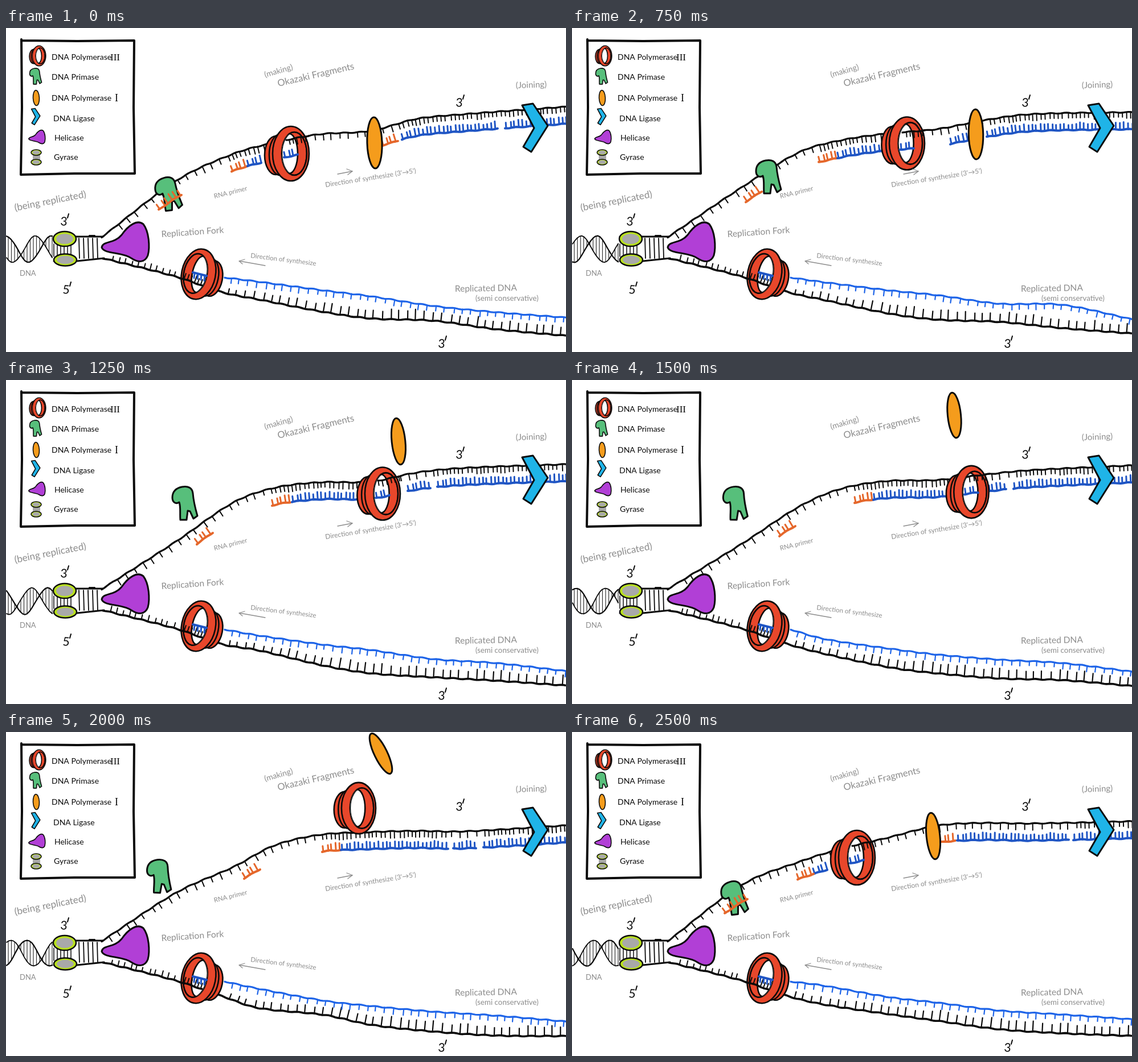
An HTML page with a canvas for the animation above (2750 ms loop, 983 by 570 pixels).

```html
<!DOCTYPE html>
<html lang="en">
<head>
<meta charset="utf-8">
<title>DNA replication</title>
<style>
html, body { margin: 0; width: 100%; height: 100%; overflow: hidden; background: #fff; }
canvas { display: block; }
</style>
</head>
<body>
<canvas id="stage" width="983" height="570"></canvas>
<script>
const ctx = document.getElementById('stage').getContext('2d');
const STEP = 250, STEPS = 11;
const INK = '#0b0b0b', GRAY = '#8c8c8c', RED = '#e8472b', GREEN = '#57bf7b', AMBER = '#f59c1c',
  BLUE = '#1f55c4', LEAD = '#1e64e8', RNA = '#e5672b', PURPLE = '#b13fd6', CYAN = '#1fb4e8', LIME = '#b9e21c';

// Poses are given at these steps and interpolated at the others.
const KEYS = [0, 1, 3, 5, 6, 8, 10];

// x, y, scale
const polymerase3 = [[500, 221, 1], [529, 217, 1], [588, 203, .97], [661, 200, .97], [701, 197, .96], [619, 134, .94], [500, 221, 1]];
// x, y, rotation
const primase = [[285, 292, -.12], [302, 288, -.1], [345, 262, 0], [314, 217, 0], [287, 217, .03], [269, 254, .05], [285, 292, -.12]];
// x, y, ry, rotation
const polymerase1 = [[647, 202, 45, -.03], [675, 194, 45, -.04], [709, 187, 44, -.02], [689, 108, 41, -.1],
  [671, 62, 40, -.1], [658, 38, 39, -.45], [634, 183, 41, -.1]];

// Horizontal extents of the pieces hanging below the lagging strand
const primer = [[268, 308], [279, 318], [305, 333], [335, 366], [364, 394], [418, 449], [396, 424]];
const growing = [[396, 424, 450], [408, 445, 486], [433, 466, 548], [467, 502, 620], [496, 529, 660], [555, 588, 776], [645, 676, 872]];
const oldPrimer = [[660, 690], [686, 708]];
const patch = [null, [650, 668], [664, 696], [705, 747], [722, 765], [785, 828]];
const joined = [[695, 863], [712, 878], [728, 990], [757, 990], [775, 990], [838, 990], [880, 990]];
const tail = [[876, 990], [890, 990]];

const LAG_X = [168, 300, 400, 470, 550, 640, 720, 800, 990];
const lagging = [
  [368, 268, 221, 202, 187, 181, 160, 152, 138], [368, 276, 223, 205, 186, 180, 161, 151, 142],
  [368, 279, 218, 198, 186, 178, 163, 152, 148], [368, 283, 215, 190, 180, 179, 163, 155, 148],
  [368, 287, 222, 192, 178, 176, 167, 159, 150], [368, 282, 237, 200, 181, 176, 174, 175, 164],
  [368, 268, 228, 206, 187, 165, 160, 161, 157]];
const LEAD_X = [440, 560, 640, 750, 860, 990];
const template = [
  [477, 500, 511, 515, 530, 542], [480, 500, 509, 514, 529, 542], [478, 503, 513, 517, 528, 538],
  [475, 503, 516, 523, 529, 538], [481, 506, 516, 525, 528, 539], [485, 498, 515, 527, 534, 535],
  [479, 497, 508, 523, 530, 535]];
const copy = [
  [446, 462, 472, 489, 500, 510], [447, 466, 473, 488, 497, 506], [447, 462, 470, 485, 487, 514],
  [449, 466, 475, 491, 498, 513], [455, 473, 483, 492, 498, 514], [451, 473, 482, 492, 499, 510],
  [446, 467, 476, 490, 497, 506]];

const PRIMASE = new Path2D('M-22-10C-22-22-15-27-5-29C6-31 13-27 14-18C15-5 18 8 22 22L15 27L9 14L5 13L3 29L-8 29C-9 18-7 6-10-2C-16 2-22-2-22-10Z');
const HELICASE = new Path2D('M168 386C170 374 190 380 203 364C214 348 230 336 241 345C251 358 253 385 249 400C244 413 232 413 220 405C205 394 172 398 168 386Z');
const LIGASE = new Path2D('M906 136L925 133L951 172L922 218L908 209L927 176Z');

const random = n => { const v = Math.sin(n * 12.9898) * 43758.5453; return v - Math.floor(v); };

function at(rows, step) {
  const i = KEYS.findLastIndex(key => key <= step), a = rows[i], b = rows[i + 1];
  if (KEYS[i] === step) return a;
  const u = (step - KEYS[i]) / (KEYS[i + 1] - KEYS[i]);
  return a && b && a.map((v, j) => v + (b[j] - v) * u);
}

// Smooth function through the given points
function curve(xs, ys) {
  const last = xs.length - 1;
  const slope = i => {
    const a = Math.max(i - 1, 0), b = Math.min(i + 1, last);
    return (ys[b] - ys[a]) / (xs[b] - xs[a]);
  };
  return x => {
    let i = 0;
    while (i < last - 1 && x > xs[i + 1]) i++;
    const h = xs[i + 1] - xs[i], u = (x - xs[i]) / h, w = 1 - u;
    return w * w * (1 + 2 * u) * ys[i] + u * u * (3 - 2 * u) * ys[i + 1]
      + h * u * w * (w * slope(i) - u * slope(i + 1));
  };
}

function line(points, color = INK, width = 2) {
  ctx.beginPath();
  points.forEach(([x, y]) => ctx.lineTo(x, y));
  ctx.strokeStyle = color;
  ctx.lineWidth = width;
  ctx.stroke();
}

function strand(f, from, to, color = INK, width = 3.2) {
  const points = [];
  for (let x = from; x <= to; x += 4) points.push([x, f(x) + .7 * Math.sin(x * .23)]);
  line(points, color, width);
}

// Bases perpendicular to a strand; side is 1 below it and -1 above it
function bases(f, from, to, { gap = 15, length = () => 10, side = 1, shift = 0, color = INK, width = 2 }) {
  for (let n = Math.floor((from - shift) / gap); n * gap + shift < to; n++) {
    const x = n * gap + shift + (random(n) - .5) * gap * .3;
    if (x < from || x > to) continue;
    const m = f(x + 1) - f(x), k = side * length(x) * (.8 + .4 * random(n + 7)) / Math.hypot(1, m);
    line([[x, f(x)], [x - m * k, f(x) + k]], color, width);
  }
}

function fragment(f, extent, color) {
  if (!extent) return;
  const [from, to] = extent, base = x => f(x) + 30;
  strand(base, from, to, color, 4);
  bases(base, from + 1, to, { gap: 7, length: () => 11, side: -1, shift: from + 3, color, width: 3 });
}

function shape(path, fill, x = 0, y = 0, scale = 1, angle = 0, width = 3) {
  ctx.save();
  ctx.translate(x, y);
  ctx.rotate(angle);
  ctx.scale(scale, scale);
  ctx.fillStyle = fill;
  ctx.strokeStyle = INK;
  ctx.lineWidth = width / scale;
  ctx.fill(path);
  ctx.stroke(path);
  ctx.restore();
}

function oval(x, y, rx, ry, angle = 0) {
  const path = new Path2D();
  path.ellipse(x, y, rx, ry, angle, 0, 7);
  return path;
}

function rings(x, y, scale, angle = 0, flip = 1, width = 2.6) {
  ctx.save();
  ctx.translate(x, y);
  ctx.rotate(angle);
  ctx.scale(flip, 1);
  const part = (path, fill) => shape(path, fill, 0, 0, scale, 0, width);
  part(oval(-26, 3, 20, 34), RED);
  part(oval(-19, 2, 19, 36), RED);
  part(oval(0, 0, 32, 48), RED);
  const hole = oval(6, 0, 22, 38);
  part(hole, RED);
  ctx.scale(scale, scale);
  ctx.clip(hole);
  ctx.scale(1 / scale, 1 / scale);
  part(oval(-3, 0, 15, 35), '#fff');
  part(hole, 'transparent');
  ctx.restore();
}

function gyrase(x, y, rx, ry, width) {
  shape(oval(x, y, rx, ry), LIME, 0, 0, 1, 0, width);
  ctx.fillStyle = '#a9a9a9';
  ctx.fill(oval(x, y, rx * .74, ry * .7));
}

function label(text, x, y, size, angle = 0, color = GRAY, family = 'Lato, sans-serif') {
  ctx.save();
  ctx.translate(x, y);
  ctx.rotate(angle * Math.PI / 180);
  ctx.font = `${size}px ${family}`;
  ctx.fillStyle = color;
  ctx.fillText(text, 0, 0);
  ctx.restore();
}

function helix(step) {
  const wave = offset => x => 389 - 23 * Math.cos((x - offset - step * 160 / 11) * Math.PI / 40);
  const a = wave(0), b = wave(-28);
  for (let x = 4; x < 82; x += 5.5) line([[x, a(x)], [x, b(x)]], '#333', 1.2);
  strand(a, 1, 82, INK, 2.2);
  strand(b, 1, 82, INK, 1.8);
}

function fork() {
  line([[84, 367], [120, 367], [170, 367]], INK, 3);
  line([[84, 410], [125, 410], [172, 405]], INK, 3);
  for (let x = 84; x < 118; x += 6) line([[x, 380], [x, 402]], INK, 1.5);
  for (let x = 128; x < 162; x += 8) line([[x, 370], [x + 1, 405]], INK, 1.8);
  line([[146, 365], [156, 365]]);
  gyrase(103, 371, 20, 13, 2.4);
  gyrase(104, 408, 20, 10.5, 2.4);
  shape(HELICASE, PURPLE);
}

function legend() {
  line([[27, 22], [125, 23], [225, 22], [224, 140], [226, 256], [120, 256], [26, 258], [28, 140], [27, 20]], INK, 4);
  rings(58, 49, .37, 0, 1, 1.6);
  shape(PRIMASE, GREEN, 52, 85, .48, 0, 1.6);
  shape(oval(53, 123, 5.5, 13.5, -.05), AMBER, 0, 0, 1, 0, 1.6);
  shape(LIGASE, CYAN, -263.5, 96.2, .34, 0, 1.6);
  shape(HELICASE, PURPLE, -19, 60, .35, 0, 1.6);
  ctx.fillStyle = '#a9a9a9';
  ctx.fillRect(47, 219, 13, 16);
  gyrase(53, 219, 9, 5, 1.6);
  gyrase(53, 236, 9, 5, 1.6);
  const rows = [['DNA Polymerase', 80, 56], ['DNA Primase', 80, 91], ['DNA Polymerase', 80, 128],
    ['DNA Ligase', 83, 164], ['Helicase', 85, 198], ['Gyrase', 84, 232]];
  for (const [text, x, y] of rows) label(text, x, y, 14, 0, INK);
  label('III', 183, 57, 17, 0, INK, '"Liberation Serif", serif');
  label('I', 191, 129, 18, 0, INK, '"Liberation Serif", serif');
}

function labels() {
  label('(being replicated)', 16, 322, 17, -11);
  label('DNA', 24, 436, 13);
  label('Replication Fork', 273, 368, 15.5, -4);
  label('RNA primer', 366, 300, 11.5, -14);
  label('(making)', 455, 87, 14, -16);
  label('Okazaki Fragments', 478, 103, 16.5, -13);
  label('(Joining)', 895, 106, 15, -2);
  label('Direction of synthesize', 429, 404, 11.5, 7);
  label('Direction of synthesize (3\'→5\')', 561, 280, 12, -9);
  label('Replicated DNA', 788, 464, 15.5, -1);
  label('(semi conservative)', 824, 480, 13.3);
  line([[582, 257], [608, 252]], GRAY, 1.3);
  line([[598, 248], [608, 252], [600, 258]], GRAY, 1.3);
  line([[455, 418], [410, 410]], GRAY, 1.3);
  line([[419, 407], [409, 410], [415, 415]], GRAY, 1.3);
  for (const [text, x, y] of [['3', 95, 347], ['5', 99, 467], ['3', 789, 138], ['3', 758, 562]]) {
    label(text, x, y, 21, 4, INK);
    line([[x + 15, y - 20], [x + 13, y - 13]], INK, 2);
  }
}

function draw(step) {
  ctx.fillStyle = '#fff';
  ctx.fillRect(0, 0, 983, 570);
  ctx.lineCap = ctx.lineJoin = 'round';
  const shift = step * 30;
  const top = curve(LAG_X, at(lagging, step));
  const bottom = curve([170, 300, 380, ...LEAD_X], [405, 438, 465, ...at(template, step)]);
  const lead = curve([384, ...LEAD_X], [439, ...at(copy, step)]);
  const attached = step < 7 || step === 10;
  const grown = at(growing, step), [px, py, ps] = at(polymerase3, step);

  helix(step);
  strand(top, 168, 985);
  bases(top, 180, 985, { shift });
  bases(top, grown[0], attached ? px : grown[2], { shift: shift + 7 });
  bases(top, at(joined, step)[0], 985, { shift: shift + 7 });

  strand(bottom, 170, 985, INK, 3.6);
  bases(bottom, 182, 300, { gap: 11, length: () => 9, side: -1, shift });
  bases(bottom, 383, 985, { length: x => Math.min(9 + (x - 380) / 30, 16), side: -1, shift, width: 2.2 });
  strand(lead, 384, 985, LEAD, 3.2);
  bases(lead, 390, 985, { length: () => 9, shift: shift + 6, color: LEAD, width: 2.2 });

  fragment(top, grown.slice(0, 2), RNA);
  fragment(top, grown.slice(1), BLUE);
  fragment(top, at(oldPrimer, step), RNA);
  for (const piece of [patch, joined, tail]) fragment(top, at(piece, step), BLUE);
  if (step === 10) fragment(top, growing[0].slice(1), BLUE);
  if (step === 10) fragment(top, at(primer, step), RNA);

  rings(px, py, ps);
  if (attached) {
    strand(top, px - 8, px + 32);
    bases(top, px - 8, px + 32, { gap: 7, shift });
    fragment(top, [px - 12, px + 12], BLUE);
  }

  rings(338, 433, .93, .2, -1);
  strand(bottom, 304, 344, INK, 3.6);
  bases(bottom, 308, 344, { gap: 6, length: () => 12, side: -1 });
  line([[328, 430], [352, 436]], BLUE, 4);
  for (let x = 331; x < 350; x += 6) line([[x, 431 + (x - 331) / 4], [x - 1, 440 + (x - 331) / 4]], BLUE, 3);

  const [gx, gy, ga] = at(primase, step);
  shape(PRIMASE, GREEN, gx, gy, 1, ga);
  fragment(top, at(primer, step % 10), RNA);
  const [ox, oy, ry, angle] = at(polymerase1, step);
  shape(oval(0, 0, ry * .29, ry), AMBER, ox, oy, 1, angle);
  shape(LIGASE, CYAN);

  fork();
  legend();
  labels();
}

let shown = -1;
function tick(now) {
  const step = Math.floor(now / STEP) % STEPS;
  if (step !== shown) draw(shown = step);
  requestAnimationFrame(tick);
}
draw(0);
requestAnimationFrame(tick);
</script>
</body>
</html>
```
